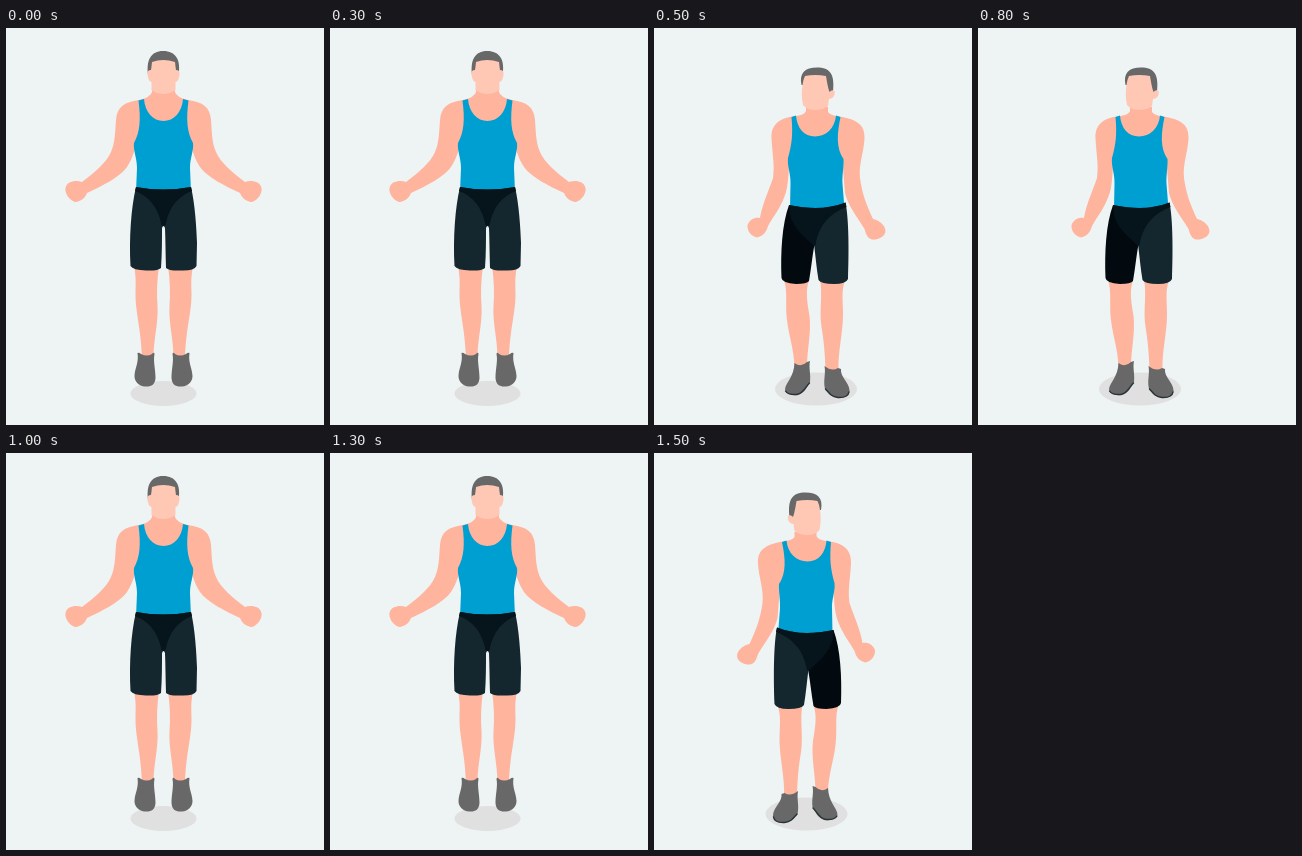
These frames come from a looping animation (318 px wide and 397 px high, 2 s). An HTML page:

```html
<!DOCTYPE html>
<html lang="en">
<head>
<meta charset="utf-8">
<title>Hop twist exercise</title>
<style>
  html, body { margin: 0; width: 100%; height: 100%; overflow: hidden; background: #eef3f4; }
  svg { display: block; width: 100%; height: 100%; }
  .shadow { fill: #e0e0e0; }
  .skin { fill: #ffb49e; }
  .face { fill: #ffc8b5; }
  .hair, .shoe { fill: #686868; }
  .sole { fill: none; stroke: #26343a; stroke-width: 1.4; stroke-linecap: round; }
  .top { fill: #009fd1; }
  .shorts { fill: #14272f; }
  .brief { fill: #06141c; }
  .far { fill: #020a10; }
</style>
</head>
<body>
<svg viewBox="0 0 318 397">
  <defs>
    <!-- left half of the jump, mirrored for the right -->
    <g id="limbs">
      <path class="skin" d="M158 56H146V64Q145 69 133 72C118 74 111 79 110 92C109 106 109 115 105 124C101 134 88 145 76 154C70 152 61 153 59.500 160C58.500 165 63 172 69 174C75 173.500 79 170 81 165C96 158 114 149 121 139C127 130 129 121 132 110L158 120Z"/>
      <path class="skin" d="M128 238C130.500 251 129.500 257 129.500 266C129.500 285 135 300 136 330H147.500C147.500 311 152.500 295 151.500 278C150.500 265 151 252 153 238Z"/>
      <path class="shoe" d="M131.500 325Q133 324 135 326Q141 329 146 326Q148 323.500 148.500 326C147 333 149.500 341 149.500 350C149 357 145 359 139 358.500C133 358 128.500 354 128.500 348C129 339 133 335 131.500 325Z"/>
    </g>
    <g id="jump">
      <ellipse class="shadow" cx="157.500" cy="365.500" rx="33" ry="12.500"/>
      <use href="#limbs"/>
      <use href="#limbs" transform="matrix(-1 0 0 1 315 0)"/>
      <path class="top" d="M132.500 72.500L138 71C139 84 147 93 157.500 93C168 93 176 84 177 71L182.500 72.500C180 92 181 104 187 115C188 122 184 130 184 140L185 164H130L131 140C131 130 127 122 128 115C134 104 135 92 132.500 72.500Z"/>
      <path class="shorts" d="M130 159Q157 164 185 159C189 176 190.500 200 191 215L190.500 238Q188 243 175 242.500Q163 243 160 240C159.500 226 159.500 212 159 200Q157.500 196 156 200C156 212 156 226 155 240Q152 243 140 242.500Q127 242 124.500 238C123 210 125 180 130 159Z"/>
      <path class="brief" d="M130 159Q157 164 185 159L186 163C173 168 163 178 159.500 197Q157.500 199 155.500 197C152 178 142 168 129 163Z"/>
      <path class="hair" d="M142 47C140 32 145 23 157 23C170 23 175 32 172.500 47Z"/>
      <path class="face" d="M145 42Q145.500 39 146 34Q157 30 169 34Q169.500 39 170 42Q174 42 173.500 46Q173 53 169.500 54V62Q164 66 157.500 66Q151 66 145.500 62V54Q142 53 141.500 46Q141 42 145 42Z"/>
    </g>
    <g id="twist">
      <ellipse class="shadow" cx="162" cy="361" rx="41" ry="16.500"/>
      <path class="skin" d="M152 79H174V84Q176 87 185 88.500C204 91 211 98 210.500 110C210 124 204.500 136 206 150C208 166 213 178 219 191C224 192 231 196 231.500 203C231 209 224 212 218 211.500C213 210 212 206 210.500 201C204 190 194 178 191 165L188 128L137 126C134 140 135 152 132 164C128 178 119 189 114 198C112 205 109 208 103 209.500C97 208 93 203 93.500 197C96 191 101 189 106 190C108 177 114 165 119 150C121 137 118 124 117.500 110C117 98 124 90 140 88.500Q151 87 152 83Z"/>
      <path class="skin" d="M130 252C134 264 131 276 133 292C135 309 140 321 140.500 339H153C153 322 157.500 304 155.500 288C153.500 275 151 264 155 252Z"/>
      <path class="skin" d="M166 252C169 266 165 282 167.500 299C170 314 171 326 171.500 343H184.500C183.500 326 189 304 189 287C189 274 187 263 191 252Z"/>
      <path class="shoe" d="M140.500 335Q147 340 153 334L156 333C154.500 340 157 346 156 354C153 358 151 366 143 367Q132 368 131 361C132 354 140 349 140.500 335Z"/>
      <path class="sole" d="M131.500 363Q134 367 143 366.500C150 365 152 358 155.500 355"/>
      <path class="shoe" d="M170.500 338Q178 344 184 340L187 341C186 349 195 354 195.500 362C195.500 369 190 370 184 369.500C176 369 175 365 171 361C169 352 172 346 170.500 338Z"/>
      <path class="sole" d="M171.500 361C175 365 177 368.500 184 369.500Q194 370 195 364"/>
      <path class="top" d="M137.500 89L142 87.500C143 100 150 108.500 161 108.500C172 108.500 181 100 182 87.500L186.500 89C183 106 182 120 189.500 131C190 138 188 147 188.500 156L190.500 181H136L136.500 156C137 146 133 138 134 130C138 116 139 106 137.500 89Z"/>
      <path class="shorts" d="M135 177Q168 184 191.500 174.500C195 192 195 225 194 251Q192 256 180 256Q167 256 164.500 252C162.500 240 161.500 228 160 216Z"/>
      <path class="far" d="M135 177L150 185L160.500 216C158 230 157 242 155 253Q153 256 142 256Q128 255 127.500 250C126.500 224 128 196 135 177Z"/>
      <path class="brief" d="M135 177Q168 184 191.500 174.500L192.500 179C177 185 165 196 161.500 217Q160 219 158 216C151 209 140 201 136 187Z"/>
      <path class="hair" d="M147.500 57C145 45 151 39.500 163 39.500C176 39.500 181 46 179 64L173 70L149 57Z"/>
      <path class="face" d="M148.500 57Q149 52 151 48Q161 46 172 48C173 54 174 60 175.500 64Q178 61 180.500 63C181.500 67 179 71 175 71L174 78Q169 82 161 82Q153 82 149 77C147.500 70 147.500 63 148.500 57Z"/>
    </g>
  </defs>
  <use class="pose" href="#jump"/>
  <use class="pose" href="#twist"/>
  <use class="pose" href="#twist" transform="matrix(-1 0 0 1 314.500 0)"/>
</svg>
<script>
  const BEAT = 500;
  const order = [0, 1, 0, 2];
  const poses = document.querySelectorAll('.pose');

  function draw() {
    const current = order[Math.floor(performance.now() / BEAT) % order.length];
    poses.forEach((pose, i) => { pose.style.display = i === current ? '' : 'none'; });
    requestAnimationFrame(draw);
  }
  draw();
</script>
</body>
</html>
```
